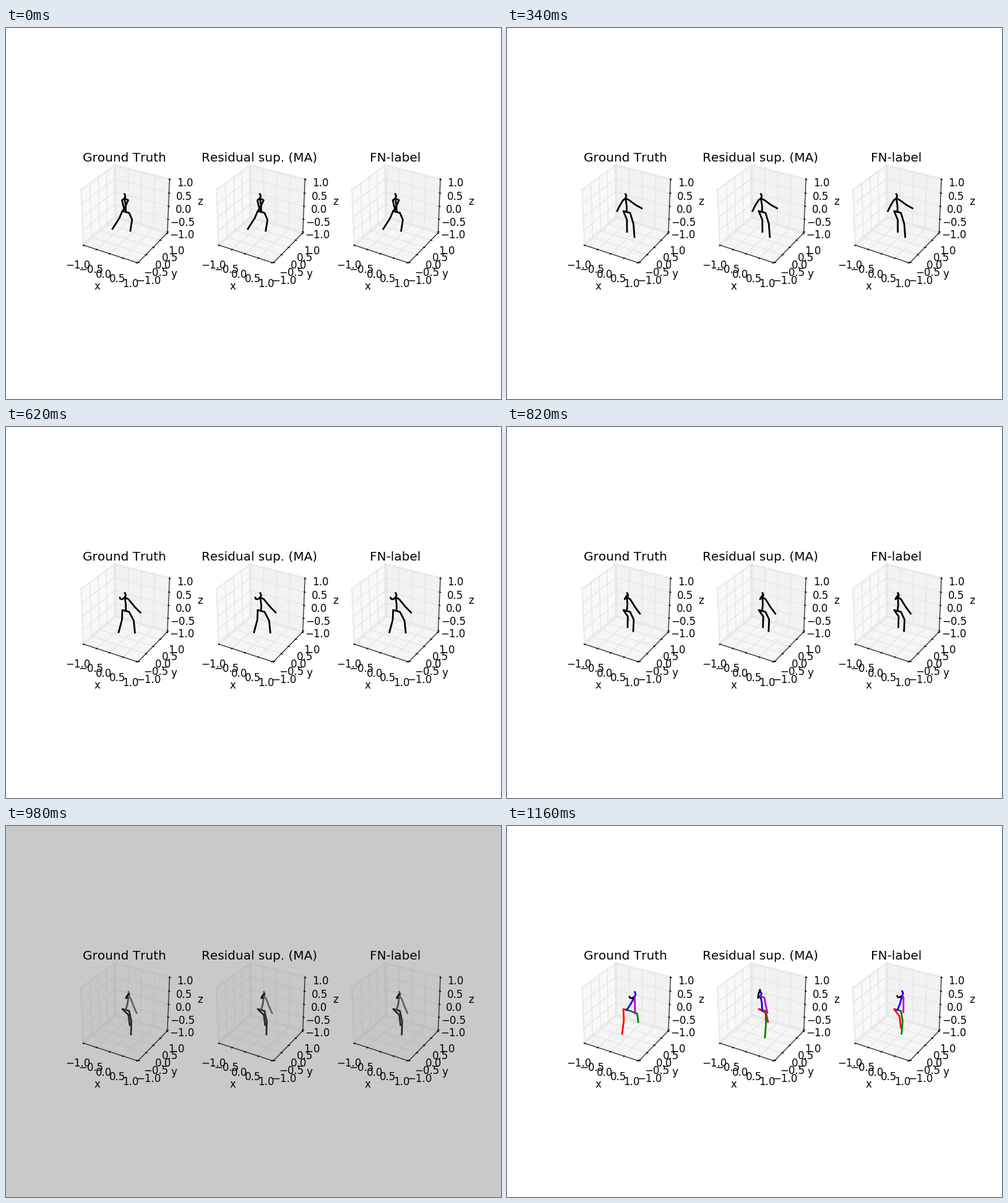
A matplotlib script for the animation above (1180 ms loop, 800x600 px).

```python
import numpy as np
import matplotlib.pyplot as plt
from matplotlib.animation import FuncAnimation
from matplotlib.patches import Polygon, Rectangle

plt.rcParams["font.family"] = "DejaVu Sans"
plt.rcParams["text.kerning_factor"] = 6   # whole-pixel letter spacing

W, H = 800, 600
FRAMES, STEP = 59, 20
LAST = FRAMES - 1
SEED = 49                # observed frames before the forecasts take over
SIDE = 182.35            # side of one square plot
PITCH = 218.82           # distance between plots
LEFT, BOTTOM = 100, 391.2
EDGE = 1 + 1 / 24        # where the panes sit in data units
TICKS = (-1, -0.5, 0, 0.5, 1)

# Camera axes: right, up, towards the viewer
U = np.array([0.866, 0.5, 0])
V = np.array([-0.25, 0.433, 0.866])
N = np.array([0.433, -0.75, 0.5])


def project(points, shift=0):
    """Perspective view of data points (-1..1) in stage pixels."""
    p = np.atleast_2d(np.asarray(points, float)) / 2
    depth = 10 - p @ N
    scale = SIDE / 0.185
    x = LEFT + shift + (p @ U / depth + 0.095) * scale
    y = BOTTOM - (p @ V / depth + 0.095) * scale
    return np.column_stack([x, y])


ROOT = np.array([193.5, 297.5])
HIP_L, HIP_R = np.array([188, 296]), np.array([199, 299])
NECK = np.array([191.5, 275.5])

# Key points of the swinging ends, by frame index
ANKLE_L = {0: (172, 325), 9: (193, 327), 31: (182, 332), 49: (200, 322), LAST: (186, 336)}
ANKLE_R = {0: (201, 328), 9: (193, 331), 17: (206, 338), 41: (204, 330),
           49: (202, 337), LAST: (212, 317)}
WRIST_L = {0: (194, 297), 17: (178, 296), 31: (184, 276), 41: (195, 271), LAST: (198, 276)}
WRIST_R = {0: (189, 295), 9: (210, 290), 31: (217, 300), LAST: (207, 303)}

# Where the forecasts end: ankles, neck, wrists
MODEL_A = np.array([(203, 317), (198, 342), (191, 275), (190, 265), (202, 302)])
MODEL_B = np.array([(199, 326), (200, 336), (201, 274), (193, 275), (203, 301)])


def glide(track, i):
    """Smooth cubic path through the key points of a track."""
    keys = np.array(list(track))
    points = np.array(list(track.values()), float)
    slopes = np.gradient(points, keys, axis=0)
    k = min(np.searchsorted(keys, i, side="right") - 1, len(keys) - 2)
    span = keys[k + 1] - keys[k]
    t = (i - keys[k]) / span
    s = 1 - t
    return (s * s * ((1 + 2 * t) * points[k] + t * span * slopes[k])
            + t * t * ((1 + 2 * s) * points[k + 1] - s * span * slopes[k + 1]))


def true_pose(i):
    lean = NECK + (15 * (i / LAST) ** 5, 0)
    return np.array([glide(ANKLE_L, i), glide(ANKLE_R, i), lean,
                     glide(WRIST_L, i), glide(WRIST_R, i)])


def pose_at(model, i):
    if model is None or i < SEED:
        return true_pose(i)
    t = (i - SEED) / (LAST - SEED)
    return true_pose(SEED) * (1 - t) + model * t


def leg(hip, ankle):
    """The shorter the leg looks, the further the knee sticks out."""
    bend = 0.18 * (50 - np.linalg.norm(ankle - hip))
    knee = (hip + ankle) / 2 + bend * np.array([1, -0.9])
    return [ROOT, hip, knee, ankle]


def arm(neck, shoulder, wrist, bend):
    return [neck, shoulder, (shoulder + wrist) / 2 + bend, wrist]


def limbs(pose):
    """Left leg, right leg, spine, left arm, right arm."""
    ankle_l, ankle_r, neck, wrist_l, wrist_r = pose
    back = ROOT + 0.45 * (neck - ROOT) + (0.8, 0)
    width = 6 - 0.4 * (neck - NECK)[0]     # narrows as the body turns
    return [
        leg(HIP_L, ankle_l),
        leg(HIP_R, ankle_r),
        [ROOT, back, neck, neck + (1.5, -3.5), neck + (0, -7)],
        arm(neck, neck + (-4, 3), wrist_l, (-1, 1)),
        arm(neck, neck + (width, 3), wrist_r, (0, 1)),
    ]


COLORS = [(1, 0, 0), (0, 0.5, 0), (0, 0, 1), (0, 0, 0), (0.75, 0, 0.75)]
GREYS = ["#282828", "#282828", "#505050", "#000000", "#646464"]
PANE_TONES = (0.95, 0.9, 0.925)

fig = plt.figure(figsize=(8, 6), dpi=100, facecolor="white")
ax = fig.add_axes([0, 0, 1, 1])
ax.set_xlim(0, W)
ax.set_ylim(H, 0)
ax.axis("off")
backdrop = ax.add_patch(Rectangle((0, 0), W, H, fc="white", ec="none", zorder=0))

panes, grids = [], []


def stroke(points, shift, **style):
    line, = ax.plot(*project(points, shift).T, **style)
    return line


def label(point, shift, text, va):
    x, y = project(point, shift)[0]
    ax.text(x, y, text, size=12, ha="center", va=va, zorder=6)


def on_axis(axis, value, away):
    """Point beside one axis edge, pushed away from the centre."""
    signs = ((0, -1, -1), (1, 0, -1), (1, 1, 0))[axis]
    point = np.array(signs, float) * away
    point[axis] = value
    return point


def draw_box(shift):
    e = EDGE
    walls = [
        [(-e, -e, -e), (-e, e, -e), (-e, e, e), (-e, -e, e)],
        [(-e, e, -e), (e, e, -e), (e, e, e), (-e, e, e)],
        [(-e, -e, -e), (e, -e, -e), (e, e, -e), (-e, e, -e)],
    ]
    for wall, tone in zip(walls, PANE_TONES):
        pane = Polygon(project(wall, shift), alpha=0.5, lw=1, zorder=1)
        panes.append((ax.add_patch(pane), tone))

    for t in TICKS:
        for path in ([(t, -e, -e), (t, e, -e), (t, e, e)],
                     [(e, t, -e), (-e, t, -e), (-e, t, e)],
                     [(e, e, t), (-e, e, t), (-e, -e, t)]):
            grids.append(stroke(path, shift, color="0.9", lw=1, zorder=2))

    for axis, name in enumerate("xyz"):
        ends = [on_axis(axis, v, e) for v in (-e, e)]
        stroke(ends, shift, color="k", lw=0.75, zorder=3)
        side = 1 if axis == 0 else 0
        for t in TICKS:
            inner, outer = on_axis(axis, t, e), on_axis(axis, t, e)
            sign = np.sign(inner[side])
            outer[side] += sign / 30
            inner[side] -= sign / 60
            stroke([inner, outer], shift, color="k", lw=1, zorder=3)
            text = f"{t:.1f}".replace("-", "\u2212")
            label(on_axis(axis, t, e + 0.372), shift, text, "top")
        label(on_axis(axis, 0, e + 0.8), shift, name, "center")


figures = []
PLOTS = [("Ground Truth", None), ("Residual sup. (MA)", MODEL_A), ("FN-label", MODEL_B)]
for n, (title, model) in enumerate(PLOTS):
    shift = n * PITCH
    draw_box(shift)
    ax.text(LEFT + SIDE / 2 + shift, 216.4, title, size=14.4,
            ha="center", va="baseline", zorder=6)
    bones = [ax.plot([], [], lw=2, zorder=5, solid_capstyle="projecting")[0]
             for _ in COLORS]
    figures.append((shift, model, bones))


def set_tone(dim):
    backdrop.set_facecolor("#c9c9c9" if dim else "white")
    for pane, tone in panes:
        pane.set_facecolor(str(0.775 if dim else tone))
        pane.set_edgecolor(str(0.74 if dim else tone))
    for line in grids:
        line.set_color("0.745" if dim else "0.9")


def update(i):
    dim = i == SEED      # brief grey flash as the forecasts begin
    set_tone(dim)
    for shift, model, bones in figures:
        for k, (bone, path) in enumerate(zip(bones, limbs(pose_at(model, i)))):
            x, y = np.array(path).T
            bone.set_data(x + shift, y)
            bone.set_color("k" if i < SEED else (GREYS if dim else COLORS)[k])
    return []


anim = FuncAnimation(fig, update, frames=FRAMES, interval=STEP,
                     repeat=True, repeat_delay=0, blit=False)
plt.show()
```
